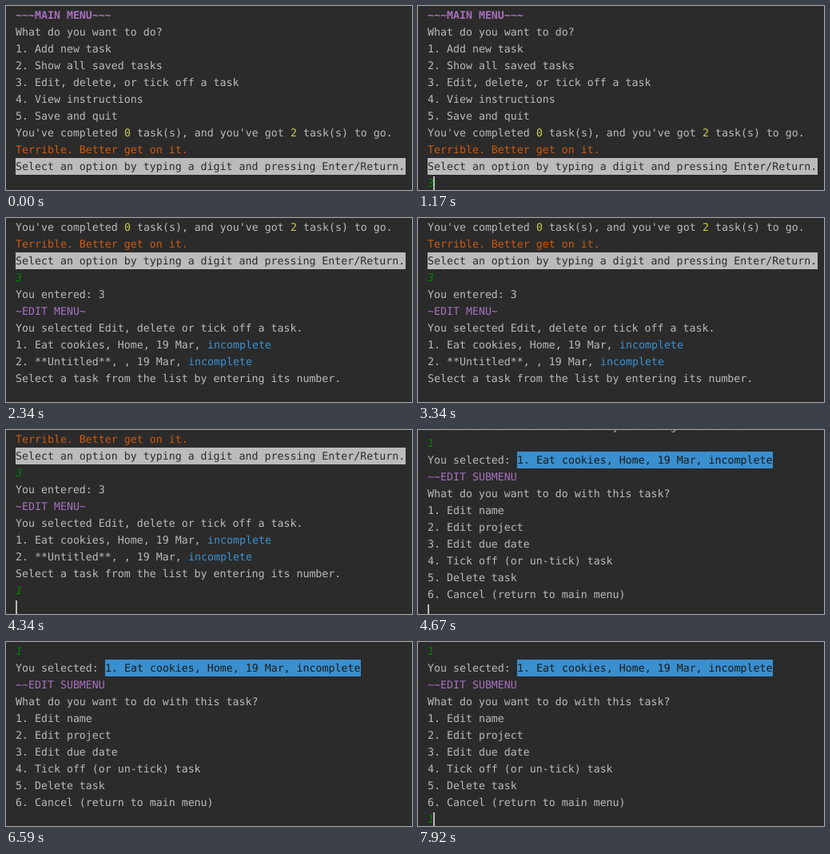
Recreate the animation shown at these times as an HTML page. Size 508 by 230 pixels, loop 8 s.

```html
<!DOCTYPE html>
<html lang="en">
<head>
<meta charset="utf-8">
<title>Task list console</title>
<style>
  html, body { margin: 0; width: 100%; height: 100%; overflow: hidden; background: #2b2b2b; }
  svg { display: block; }
  text {
    font: 13.288px "DejaVu Sans Mono", "Noto Sans Mono", monospace;
    fill: #bbbbbb;
    white-space: pre;
    text-rendering: geometricPrecision;
  }
  .title { fill: #a771bf; font-weight: bold; }
  .head { fill: #a771bf; }
  .warn { fill: #cc5a10; }
  .count { fill: #cbcb55; }
  .todo { fill: #3993d4; }
  .input { fill: #007f00; font-style: italic; }
  .prompt { fill: #2b2b2b; }
  .task { fill: #1b1b1b; }
</style>
</head>
<body>
<svg id="stage" width="508" height="230" viewBox="0 0 508 230">
  <g id="page"></g>
</svg>
<script>
const LOOP = 8000, LEFT = 12, CHAR = 8, LINE = 21, TOP = 1, BASE = 15;
const BOXES = { prompt: '#bbbbbb', task: '#3a8fce' };

// Each line is plain text or a list of parts: text, or [class, text].
const lines = [
  [['title', '~~~MAIN MENU~~~']],
  'What do you want to do?',
  '1. Add new task',
  '2. Show all saved tasks',
  '3. Edit, delete, or tick off a task',
  '4. View instructions',
  '5. Save and quit',
  ["You've completed ", ['count', '0'], " task(s), and you've got ", ['count', '2'], ' task(s) to go.'],
  [['warn', 'Terrible. Better get on it.']],
  [['prompt', 'Select an option by typing a digit and pressing Enter/Return.']],
  [['input', '3']],
  'You entered: 3',
  [['head', '~EDIT MENU~']],
  'You selected Edit, delete or tick off a task.',
  ['1. Eat cookies, Home, 19 Mar, ', ['todo', 'incomplete']],
  ['2. **Untitled**, , 19 Mar, ', ['todo', 'incomplete']],
  'Select a task from the list by entering its number.',
  [['input', '1']],
  ['You selected: ', ['task', '1. Eat cookies, Home, 19 Mar, incomplete']],
  [['head', '~~EDIT SUBMENU']],
  'What do you want to do with this task?',
  '1. Edit name',
  '2. Edit project',
  '3. Edit due date',
  '4. Tick off (or un-tick) task',
  '5. Delete task',
  '6. Cancel (return to main menu)',
  [['input', '1']]
];

// start time, lines shown, scroll in px, caret line, caret column, blink
const states = [
  { at: 0,    shown: 10, scroll: 0,             row: 10, col: 0, lit: 90 },
  { at: 670,  shown: 11, scroll: 0,             row: 10, col: 1 },
  { at: 1340, shown: 11, scroll: LINE,          row: 11, col: 0 },
  { at: 1420, shown: 17, scroll: 7 * LINE - 5,  row: 17, col: 0 },
  { at: 1840, shown: 17, scroll: 7 * LINE,      row: 17, col: 0, blink: true },
  { at: 3670, shown: 18, scroll: 7 * LINE,      row: 17, col: 1 },
  { at: 4340, shown: 18, scroll: 8 * LINE,      row: 18, col: 0 },
  { at: 4420, shown: 27, scroll: 17 * LINE - 5, row: 27, col: 0 },
  { at: 4920, shown: 27, scroll: 17 * LINE,     row: 27, col: 0, blink: true },
  { at: 7590, shown: 28, scroll: 17 * LINE,     row: 27, col: 1 }
];

const page = document.getElementById('page');

function add(parent, name, attrs) {
  const el = document.createElementNS('http://www.w3.org/2000/svg', name);
  for (const key in attrs) el.setAttribute(key, attrs[key]);
  return parent.appendChild(el);
}

const rows = lines.map((line, i) => {
  const row = add(page, 'g', { transform: `translate(${LEFT} ${TOP + i * LINE})` });
  let col = 0;
  for (const part of [].concat(line)) {
    const [kind, str] = Array.isArray(part) ? part : ['', part];
    const x = col * CHAR;
    if (BOXES[kind]) {
      add(row, 'rect', { x, y: 0, width: str.length * CHAR, height: LINE, fill: BOXES[kind] });
    }
    add(row, 'text', { x, y: BASE, class: kind }).textContent = str;
    col += str.length;
  }
  return row;
});

const caret = add(page, 'rect', { width: 2, height: 19, fill: '#bbbbbb' });

function draw(t) {
  const s = states.filter(state => state.at <= t).pop();
  const age = t - s.at;
  const lit = s.blink ? age % 1000 < 500 : age >= (s.lit || 0);
  page.setAttribute('transform', `translate(0 ${-s.scroll})`);
  rows.forEach((row, i) => row.setAttribute('visibility', i < s.shown ? 'visible' : 'hidden'));
  caret.setAttribute('x', LEFT + s.col * CHAR - s.col);
  caret.setAttribute('y', TOP + s.row * LINE + 2);
  caret.setAttribute('visibility', lit ? 'visible' : 'hidden');
}

const start = performance.now();
function tick() {
  draw((performance.now() - start) % LOOP);
  requestAnimationFrame(tick);
}
draw(0);
requestAnimationFrame(tick);
</script>
</body>
</html>
```
